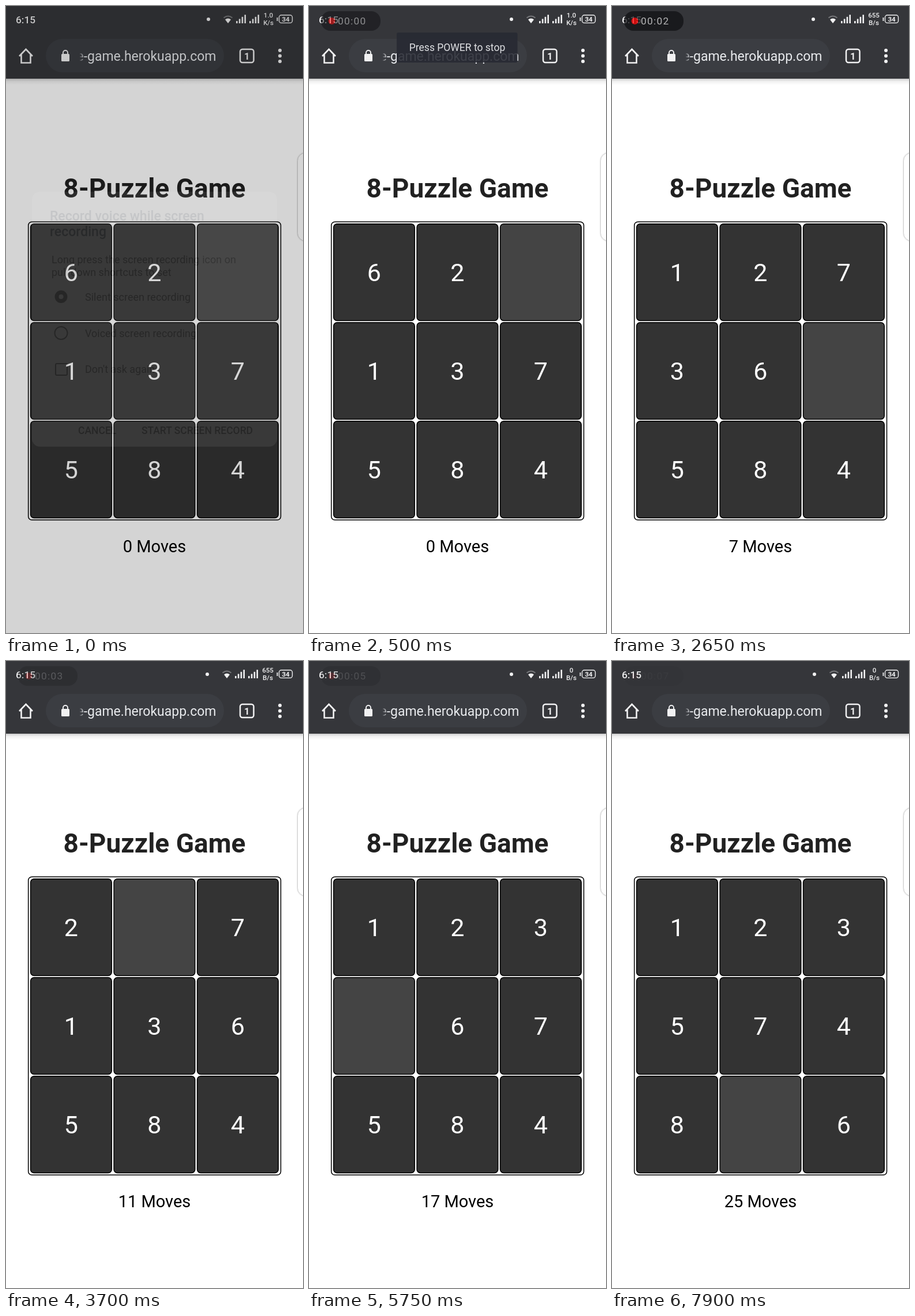
An HTML page that plays this animation: 515x1087 px, repeating every 8000 ms.

```html
<!DOCTYPE html>
<html lang="en">
<head>
<meta charset="utf-8">
<title>8-Puzzle Game</title>
<style>
  html, body { margin: 0; width: 100%; height: 100%; overflow: hidden; background: #fff; }
  svg { display: block; width: 100vw; height: 100vh; font-family: Roboto, "Open Sans", sans-serif; }
  .mid { text-anchor: middle; }
  .med { font-weight: 500; }
  .cell { fill: #333; stroke: #000; stroke-width: 1.5; }
  .cell.empty { fill: #444; }
</style>
</head>
<body>
<svg viewBox="0 0 515 1087" preserveAspectRatio="none">
  <defs>
    <linearGradient id="drop" x2="0" y2="1">
      <stop offset="0" stop-color="#000" stop-opacity=".2"/>
      <stop offset=".4" stop-color="#000" stop-opacity=".06"/>
      <stop offset="1" stop-color="#000" stop-opacity="0"/>
    </linearGradient>
    <linearGradient id="edge" x2="1" y2="0">
      <stop offset="0" stop-color="#3b3d42"/>
      <stop offset="1" stop-color="#3b3d42" stop-opacity="0"/>
    </linearGradient>
    <clipPath id="urlBox"><rect x="128" y="60" width="245" height="50"/></clipPath>
  </defs>

  <rect width="515" height="1087" fill="#fff"/>
  <rect y="126" width="515" height="11" fill="url(#drop)"/>
  <rect width="515" height="126" fill="#35363a"/>

  <!-- status bar -->
  <g fill="#f1f1f2">
    <text class="med" x="17" y="29.5" font-size="17.3">6:15</text>
    <g id="radio">
      <circle cx="351" cy="23" r="3"/>
      <path d="M377.5 20.5Q385 14.5 392.5 20.5" fill="none" stroke="#77787b" stroke-width="1.8"/>
      <path d="M380 23.5Q385 19.5 390 23.5L385 30Z"/>
      <g id="bars"></g>
    </g>
    <g class="mid med" font-size="11.5">
      <text id="rate" x="455" y="20"></text>
      <text id="unit" x="455" y="33"></text>
    </g>
    <rect x="469.5" y="20" width="1.8" height="6"/>
    <rect x="473.5" y="15.8" width="23" height="13.6" rx="4" fill="none" stroke="#f1f1f2" stroke-width="1.4"/>
    <text class="mid" x="485" y="26.8" font-size="11.5" font-weight="700">34</text>
  </g>

  <!-- browser bar -->
  <rect x="69" y="57" width="309" height="58" rx="29" fill="#3b3d42"/>
  <path d="M23 87L34.5 75L46 87M26.5 84V98.5H42.5V84" fill="none" stroke="#f1f1f2" stroke-width="2.6"/>
  <rect x="96" y="83" width="14" height="13" rx="1.5" fill="#f1f1f2"/>
  <path d="M99 84V81a4 4 0 0 1 8 0V84" fill="none" stroke="#f1f1f2" stroke-width="1.9"/>
  <g clip-path="url(#urlBox)">
    <text x="364.5" y="95" font-size="23" text-anchor="end" fill="#e8eaed">e-game.herokuapp.com</text>
    <rect x="127" y="70" width="9" height="34" fill="url(#edge)"/>
  </g>
  <rect x="406" y="75" width="23.5" height="23" rx="4" fill="none" stroke="#f1f1f2" stroke-width="2.5"/>
  <text class="mid" x="417.8" y="92.5" font-size="16.5" font-weight="700" fill="#f1f1f2">1</text>
  <g fill="#f1f1f2">
    <circle cx="475" cy="77" r="3"/><circle cx="475" cy="86.5" r="3"/><circle cx="475" cy="96" r="3"/>
  </g>

  <!-- page -->
  <text class="mid" x="257.5" y="332" font-size="46" font-weight="700" fill="#212121">8-Puzzle Game</text>
  <rect x="38.7" y="374.2" width="437.8" height="516.8" rx="6" fill="none" stroke="#000" stroke-width="1.5"/>
  <g id="board"></g>
  <text id="count" class="mid" x="257.5" y="947" font-size="29"></text>
  <rect x="505.5" y="254.5" width="40" height="153" rx="14" fill="#fff" stroke="#000" stroke-opacity=".05" stroke-width="3.5"/>
  <rect x="505.5" y="254.5" width="40" height="153" rx="14" fill="#fff" stroke="#ccc"/>

  <!-- recorder -->
  <g id="toast">
    <rect x="152" y="46" width="209.5" height="52" rx="3" fill="#272a33" opacity=".88"/>
    <text class="mid" x="257" y="78.3" font-size="17.5" fill="#dfe0e3">Press POWER to stop</text>
  </g>
  <g id="pill">
    <rect x="21" y="9" width="103" height="34" rx="16" fill="#101013"/>
    <circle cx="39.5" cy="26" r="6" fill="#f00"/>
    <text id="clock" x="50" y="32" font-size="17.3" letter-spacing="1.3" fill="#e4e4e4"></text>
  </g>

  <g id="dialog">
    <rect width="515" height="1087" opacity=".17"/>
    <g opacity=".07">
      <rect x="45" y="322" width="425" height="442" rx="14" fill="#fff"/>
      <g class="med" font-size="23" fill="#123">
        <text x="76" y="372">Record voice while screen</text>
        <text x="76" y="399">recording</text>
      </g>
      <g font-size="18">
        <text x="79" y="446">Long press the screen recording icon on</text>
        <text x="79" y="468">pull down shortcuts to set</text>
        <text x="137" y="511">Silent screen recording</text>
        <text x="137" y="574">Voiced screen recording</text>
        <text x="137" y="636">Don't ask again</text>
      </g>
      <g class="med" font-size="17.5">
        <text x="125" y="742">CANCEL</text>
        <text x="235" y="742">START SCREEN RECORD</text>
      </g>
      <g fill="none" stroke="#000" stroke-width="2">
        <circle cx="95.5" cy="504" r="7.5" stroke-width="7"/>
        <circle cx="95.5" cy="567" r="11"/>
        <rect x="86" y="620" width="20" height="20" rx="2"/>
      </g>
    </g>
  </g>
</svg>

<script>
const LOOP = 8000;
const START = [6, 2, 0, 1, 3, 7, 5, 8, 4];

// [time, tile that slides into the gap]
const MOVES = [
  [800, 2], [1150, 6], [1500, 1], [2100, 3], [2250, 6], [2400, 2], [2600, 7],
  [2800, 6], [3050, 3], [3300, 1], [3550, 2], [3800, 3], [4000, 6], [4250, 7],
  [4450, 3], [4700, 2], [4900, 1], [6150, 5], [6300, 8], [6450, 8], [6600, 8],
  [6900, 6], [7150, 7], [7450, 4], [7800, 6]
];

// [time, rate, unit, shift of the icons]
const RATES = [[0, '1.0', 'K/s', 0], [1850, '655', 'B/s', -2], [4900, '0', 'B/s', 0]];

const $ = id => document.getElementById(id);
const clamp = v => Math.max(0, Math.min(1, v));

function add(parent, tag, attrs) {
  const el = document.createElementNS('http://www.w3.org/2000/svg', tag);
  for (const key in attrs) el.setAttribute(key, attrs[key]);
  return parent.appendChild(el);
}

for (const left of [399, 422]) {
  for (let i = 0; i < 4; i++) {
    const h = 4 + i * 3.6;
    add($('bars'), 'rect', { x: left + i * 4.8, y: 30 - h, width: 2.6, height: h });
  }
}

const cells = START.map((_, i) => {
  const x = 42.6 + (i % 3) * 144.5, y = 377.8 + Math.floor(i / 3) * 171;
  const rect = add($('board'), 'rect', { x, y, width: 140.6, height: 167.6, rx: 6 });
  const text = add($('board'), 'text', {
    class: 'mid', x: x + 70.3, y: y + 99.2, 'font-size': 43, fill: '#fff'
  });
  return { rect, text };
});

const boards = [START];
for (const [, tile] of MOVES) {
  boards.push(boards[boards.length - 1].map(n => n === tile ? 0 : n === 0 ? tile : n));
}

function setText(el, value) {
  if (el.textContent !== value) el.textContent = value;
}

function draw(t) {
  const made = MOVES.filter(m => m[0] <= t).length;
  cells.forEach(({ rect, text }, i) => {
    const n = boards[made][i];
    rect.setAttribute('class', n ? 'cell' : 'cell empty');
    setText(text, n ? String(n) : '');
  });
  setText($('count'), made + ' Moves');

  const [, rate, unit, shift] = RATES.filter(r => r[0] <= t).pop();
  setText($('rate'), rate);
  setText($('unit'), unit);
  $('radio').setAttribute('transform', `translate(${shift})`);
  $('rate').setAttribute('x', 455 + shift / 2);
  $('unit').setAttribute('x', 455 + shift / 2);

  setText($('clock'), '00:0' + Math.floor(t / 1000));
  $('pill').setAttribute('opacity', (1 - Math.cos(t / 1000 * Math.PI)) / 2);
  $('toast').setAttribute('opacity', Math.min(clamp((t - 150) / 250), clamp((2400 - t) / 250)));
  $('dialog').setAttribute('visibility', t < 50 ? 'visible' : 'hidden');
}

const begin = performance.now();
function tick() {
  draw((performance.now() - begin) % LOOP);
  requestAnimationFrame(tick);
}
tick();
</script>
</body>
</html>
```
